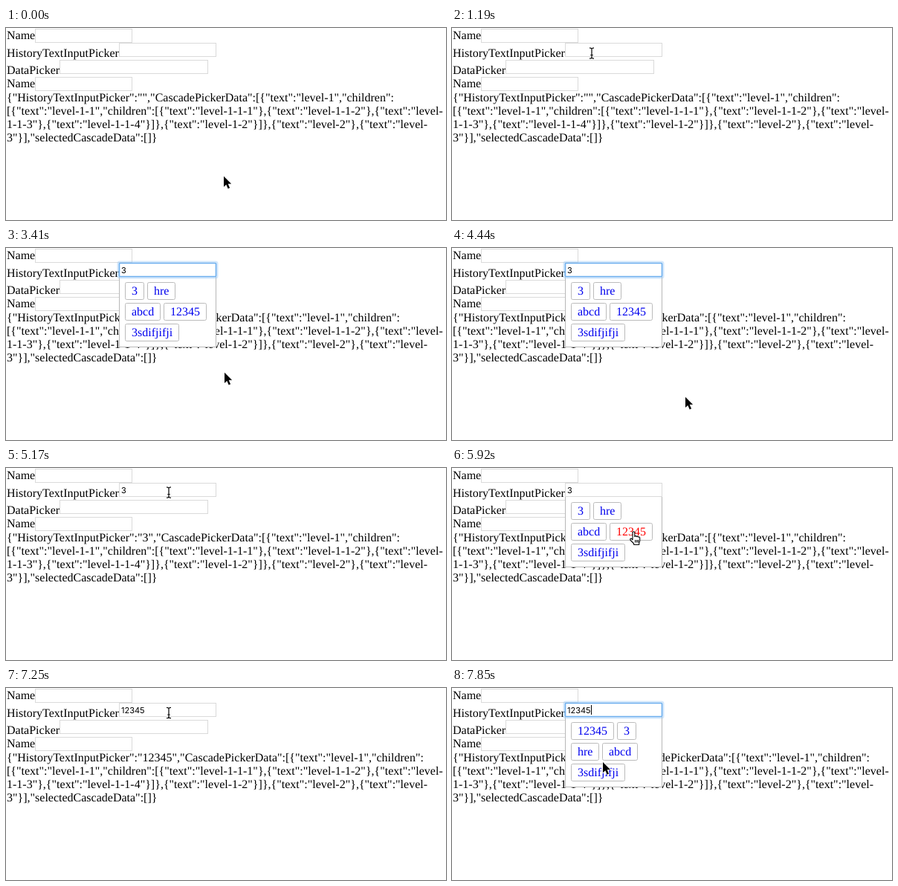
An HTML page that plays this animation: 592 by 259 pixels, repeating every 8000 ms.

```html
<!DOCTYPE html>
<html lang="en">
<head>
<meta charset="utf-8">
<title>History input picker</title>
<style>
  html, body { margin: 0; width: 100%; height: 100%; overflow: hidden; background: #fff; }
  svg { display: block; }
  text {
    font: 16px "Liberation Serif", Times, serif;
    text-rendering: geometricPrecision;
    white-space: pre;
  }
  .field { fill: #fff; stroke: #dadada; }
  .popup { fill: #fff; stroke: #b8b8b8; }
  .chip rect { fill: #fff; stroke: #bbb; }
  .chip text { fill: #00e; }
  .chip.down text { fill: red; }
  #value { font: 11px Inter, "Liberation Sans", sans-serif; }
</style>
</head>
<body>
<svg width="592" height="259" viewBox="0 0 592 259">
  <g id="page"></g>
  <g id="popup">
    <rect class="popup" x="152.5" y="38.5" width="130" height="95"/>
    <g id="chips"></g>
  </g>
  <rect class="field" x="152.5" y="20.5" width="130" height="18"/>
  <g id="ring" fill="none">
    <rect x="151" y="19" width="133" height="21" rx="2" stroke="#9ccbf5" stroke-opacity=".45" stroke-width="3"/>
    <rect x="152.5" y="20.5" width="130" height="18" rx="1" stroke="#6fb0ee" stroke-width="1.6"/>
  </g>
  <text id="value" x="155" y="34"></text>
  <rect id="caret" y="23" width="1" height="13"/>
  <g id="cursor">
    <path id="arrow" d="M0 0V14.2L3.3 11.2L5.7 16.8L8.1 15.8L5.7 10.3H10.2Z"
      stroke="#fff" stroke-width="1.6" paint-order="stroke"/>
    <path id="hand" d="M4 11V2.2a1.4 1.4 0 0 1 2.8 0V7.5a1.3 1.3 0 0 1 2.5.2a1.3 1.3 0 0 1 2.4.6a1.2 1.2 0 0 1 2 1V13q0 1.5-1 3v2.5h-7V17L1.2 12.5q-1-1.7.2-2.3q1-.4 2.6 1.6ZM7.6 12v3.6M9.7 12v3.6M11.6 12v3.6"
      fill="#fff" stroke="#000" stroke-width="1.1" stroke-linejoin="round"/>
    <g id="beam" fill="none">
      <path d="M-3-7.2Q-.4-7.2 0-5.8Q.4-7.2 3-7.2M0-6V6M-1.7 2.5H1.7M-3 7.2Q-.4 7.2 0 5.8Q.4 7.2 3 7.2" stroke="#000" stroke-width="1.2"/>
    </g>
  </g>
</svg>
<script>
const LOOP = 8000;
const $ = id => document.getElementById(id);

function add(parent, tag, attrs, text) {
  const el = document.createElementNS("http://www.w3.org/2000/svg", tag);
  for (const key in attrs) el.setAttribute(key, attrs[key]);
  if (text) el.textContent = text;
  parent.appendChild(el);
  return el;
}

const show = (id, on) => { $(id).style.display = on ? "" : "none"; };
const within = (t, spans) => spans.some(([from, to]) => t >= from && t < to);
const latest = (t, rows) => rows.filter(row => row[0] <= t).pop();

// Form rows: label, baseline, then field x, y, width
[
  ["Name", 15, 39.5, 1.5, 130],
  ["HistoryTextInputPicker", 39],
  ["DataPicker", 62, 72.5, 43.5, 199],
  ["Name", 80, 39.5, 66.5, 130]
].forEach(([label, base, x, y, width]) => {
  if (width) add($("page"), "rect", { class: "field", x, y, width, height: 18 });
  add($("page"), "text", { x: 1, y: base }, label);
});

const jsonHead = value =>
  `{"HistoryTextInputPicker":"${value}","CascadePickerData":[{"text":"level-1","children":`;
const [head] = [
  jsonHead(""),
  '[{"text":"level-1-1","children":[{"text":"level-1-1-1"},{"text":"level-1-1-2"},{"text":"level-',
  '1-1-3"},{"text":"level-1-1-4"}]},{"text":"level-1-2"}]},{"text":"level-2"},{"text":"level-',
  '3"}],"selectedCascadeData":[]}'
].map((line, i) => add($("page"), "text", { x: 1, y: 99 + 18 * i }, line));

// Two history orders, each laid out in rows
function chipList(rows) {
  const group = add($("chips"), "g", {});
  rows.forEach((row, i) => {
    let x = 160;
    row.forEach(word => {
      const chip = add(group, "g", { class: "chip", "data-word": word });
      const box = add(chip, "rect", { x: x + .5, y: 46.5 + 28 * i, height: 23, rx: 2 });
      const label = add(chip, "text", { x: x + 9, y: 63 + 28 * i }, word);
      const width = Math.round(label.getComputedTextLength()) + 18;
      box.setAttribute("width", width - 1);
      x += width + 4;
    });
  });
  return group;
}
const before = chipList([["3", "hre"], ["abcd", "12345"], ["3sdifjifji"]]);
const after = chipList([["12345", "3"], ["hre", "abcd"], ["3sdifjifji"]]);
const pressed = before.querySelector('[data-word="12345"]');

const values = [[0, ""], [2820, "3"], [6070, "12345"]];
const opened = [[1490, 4590], [5180, 6660], [7400, LOOP]];
const pressing = [[5920, 6070]];
const caretOn = [[1490, 1930], [2380, 3270], [3710, 4150], [5180, 5620], [6070, 6520], [7400, LOOP]];

// Pointer stops: time, shape, x, y
const stops = [
  [0, "arrow", 293, 200], [440, "arrow", 292, 195], [590, "arrow", 277, 160],
  [740, "arrow", 245, 106], [890, "arrow", 212, 64], [1040, "beam", 192, 36],
  [1190, "beam", 188, 34], [2380, "hand", 175, 53], [2530, "hand", 171, 57.5],
  [3270, "arrow", 236, 100], [3410, "arrow", 294, 168], [3710, "arrow", 309, 194],
  [3860, "arrow", 313, 201], [4000, "arrow", 314, 201], [4590, "arrow", 302, 172],
  [4730, "arrow", 248, 80], [4880, "beam", 223, 37], [5030, "beam", 219, 33],
  [5330, "arrow", 224, 46], [5470, "arrow", 232, 66], [5620, "hand", 236, 80],
  [5770, "hand", 239, 85], [6370, "arrow", 262, 112], [6520, "arrow", 303, 150],
  [6660, "arrow", 307, 159], [6960, "arrow", 284, 118], [7110, "beam", 226, 37],
  [7250, "beam", 219, 33.5], [7700, "arrow", 214, 71], [7850, "arrow", 203, 100]
];

function draw(t) {
  const [, value] = latest(t, values);
  const open = within(t, opened);
  const down = within(t, pressing);

  head.textContent = jsonHead(value);
  $("value").textContent = value;
  show("popup", open);
  show("ring", open && !down);
  before.style.display = t < 6070 ? "" : "none";
  after.style.display = t < 6070 ? "none" : "";
  pressed.classList.toggle("down", down);

  show("caret", within(t, caretOn));
  const end = value ? $("value").getComputedTextLength() : 0;
  $("caret").setAttribute("x", 155 + Math.round(end));

  const [, shape, x, y] = latest(t, stops);
  ["arrow", "hand", "beam"].forEach(id => show(id, id === shape));
  $("cursor").setAttribute("transform", `translate(${x} ${y})`);
}

const start = performance.now();
function tick() {
  draw((performance.now() - start) % LOOP);
  requestAnimationFrame(tick);
}
tick();
</script>
</body>
</html>
```
